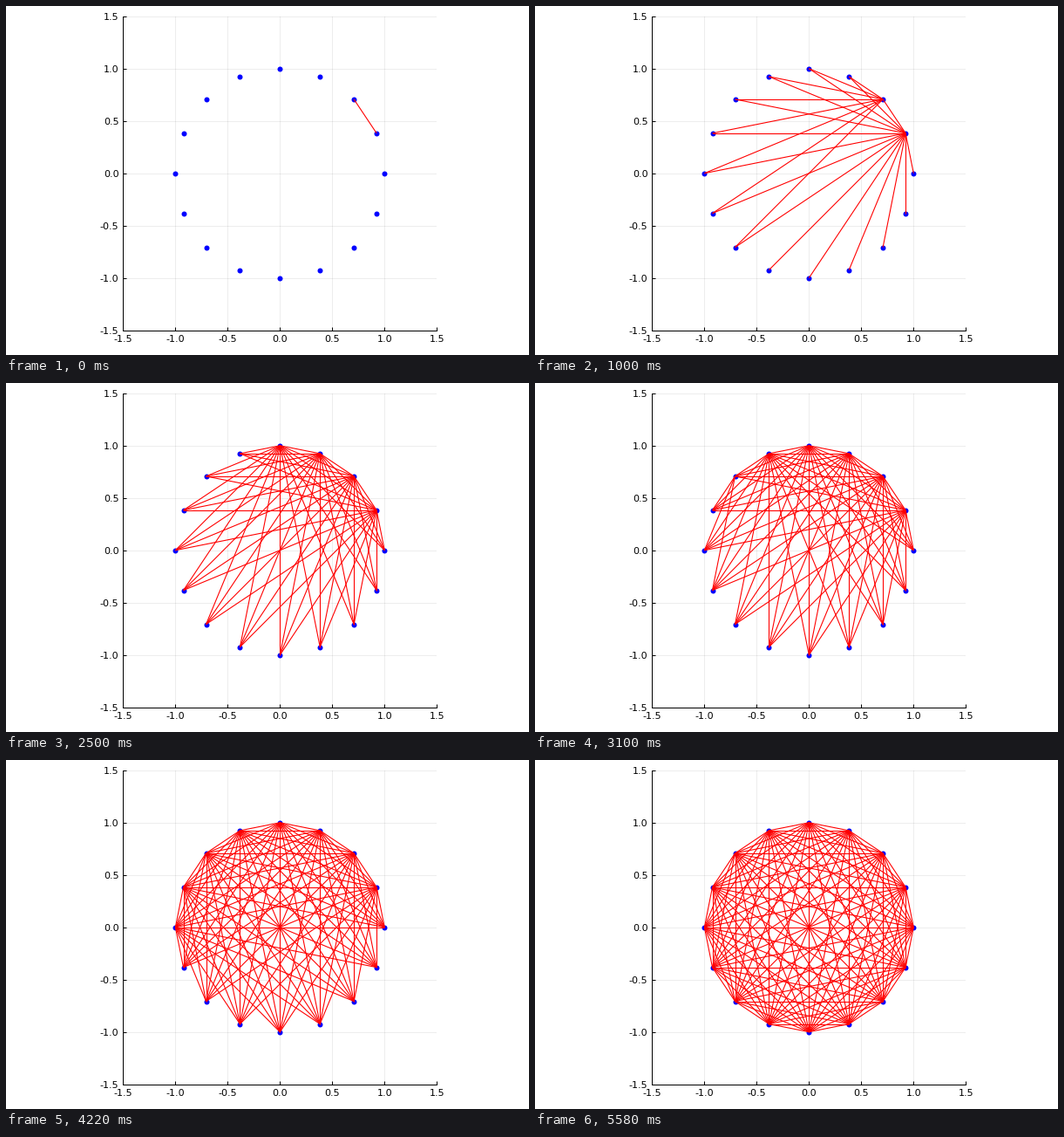
A matplotlib script that plays this animation: 600x400 px, repeating every 5.68 s.

```python
from itertools import combinations

import matplotlib.pyplot as plt
import numpy as np
from matplotlib.animation import FuncAnimation
from matplotlib.collections import LineCollection

W, H, DPI = 600, 400, 100
LEFT, TOP, SIDE = 134.4, 11.8, 359.85
TICK_MS, TICKS = 20, 284
N = 16

plt.rcParams.update({
    "font.family": "DejaVu Sans",
    "font.size": 8,
    "axes.unicode_minus": False,
})


def px(n):
    """Pixels to points."""
    return n * 72 / DPI


angle = 2 * np.pi * np.arange(1, N + 1) / N
points = np.column_stack([np.cos(angle), np.sin(angle)])
edges = [(points[i], points[j]) for i, j in combinations(range(N), 2)]

fig = plt.figure(figsize=(W / DPI, H / DPI), dpi=DPI, facecolor="white")
ax = fig.add_axes([LEFT / W, 1 - (TOP + SIDE) / H, SIDE / W, SIDE / H])
ax.set(xlim=(-1.5, 1.5), ylim=(-1.5, 1.5))

marks = np.arange(-1.5, 1.6, 0.5)
labels = [f"{m:.1f}" for m in marks]
ax.set_xticks(marks, labels)
ax.set_yticks(marks, labels)
ax.tick_params(direction="in", length=px(4), width=px(1), pad=px(5))
ax.grid(color="black", alpha=0.07, linewidth=px(1))
ax.set_axisbelow(True)
ax.spines[["top", "right"]].set_visible(False)
ax.spines[["left", "bottom"]].set_linewidth(px(1))

ax.plot(*points.T, "o", color="blue", markersize=px(6), markeredgewidth=0, zorder=3)
chords = LineCollection([], colors="red", linewidths=px(1.1), zorder=4)
ax.add_collection(chords, autolim=False)


def edge_count(tick):
    """Three edges every seven ticks, held for 1, 5 and 1 ticks."""
    cycle, step = divmod(tick, 7)
    return min(3 * cycle + 1 + (step >= 1) + (step >= 6), len(edges))


def update(tick):
    chords.set_segments(edges[:edge_count(tick)])
    return (chords,)


anim = FuncAnimation(fig, update, frames=TICKS, interval=TICK_MS,
                     repeat=True, repeat_delay=0)
plt.show()
```
